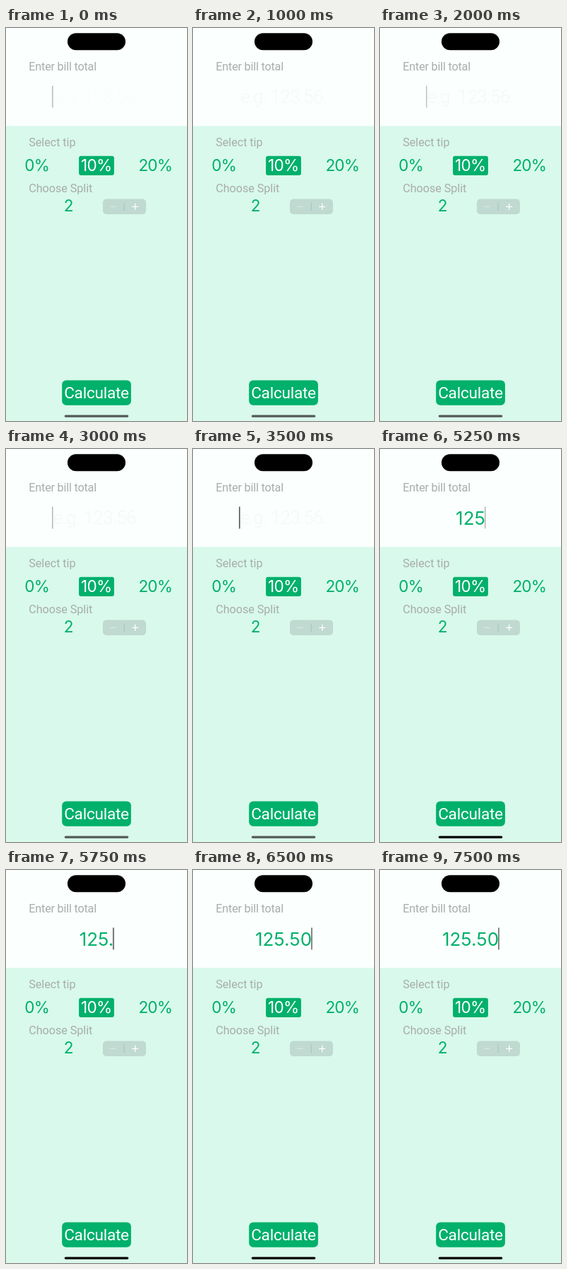
Write an HTML page that moves like this. It is 256 px wide and 555 px high and loops after 8 s.

```html
<!DOCTYPE html>
<html lang="en">
<head>
<meta charset="utf-8">
<title>Tip calculator</title>
<style>
  html, body { margin: 0; width: 100%; height: 100%; overflow: hidden; background: #fbfffe; }
  svg { display: block; width: 256px; height: 555px; }

  .label { font: 16.2px Roboto, sans-serif; fill: #a9adab; letter-spacing: -.05px; }
  .num { font: 22.6px Inter, sans-serif; fill: #00b06b; text-anchor: middle; }
  .tip { letter-spacing: -.8px; }
  .bill { font-size: 26px; }
  .on { fill: #fff; }
  .button { font: 22.6px Roboto, sans-serif; fill: #fff; text-anchor: middle; letter-spacing: -.25px; }
  .hint { font: 300 26px Roboto, sans-serif; fill: #f3f9f8; text-anchor: middle; letter-spacing: -.75px; }

  .hint, .bill, #caret, #home { animation: 8s step-end infinite; }
  .hint { animation-name: hint; }
  #caret { fill: #3a4140; animation-name: blink, travel; }
  #home { animation-name: home; }
  #b1 { animation-name: b1; }
  #b2 { animation-name: b2; }
  #b3 { animation-name: b3; }
  #b4 { animation-name: b4; }

  @keyframes hint {
    0% { opacity: .25; }
    3.125% { opacity: .45; }
    6.25% { opacity: .65; }
    9.375% { opacity: .8; }
    12.5% { opacity: .9; }
    15.625% { opacity: 1; }
    46.875%, 100% { opacity: 0; }
  }
  @keyframes blink {
    0% { opacity: .38; }
    3.125% { opacity: 0; }
    6.25% { opacity: 1; }
    9.375% { opacity: .9; }
    12.5% { opacity: 0; }
    15.625% { opacity: 1; }
    25% { opacity: .34; }
    28.125% { opacity: 0; }
    31.25% { opacity: 1; }
    37.5% { opacity: .4; }
    40.625% { opacity: 0; }
    43.75% { opacity: 1; }
    53.125% { opacity: 0; }
    56.25% { opacity: .6; }
    59.375% { opacity: 1; }
    65.625% { opacity: .4; }
    68.75% { opacity: 1; }
    81.25% { opacity: .9; }
    84.375% { opacity: 1; }
    87.5% { opacity: .4; }
    90.625% { opacity: 0; }
    93.75%, 100% { opacity: .9; }
  }
  @keyframes travel {
    0% { transform: translateX(65.1px); }
    46.875% { transform: translateX(148px); }
    68.75% { transform: translateX(151.2px); }
    75% { transform: translateX(159.4px); }
    81.25%, 100% { transform: translateX(167.2px); }
  }
  @keyframes home {
    0% { fill: #535a57; }
    46.875%, 100% { fill: #000; }
  }
  @keyframes b1 {
    0% { opacity: 0; }
    46.875% { opacity: 1; }
    68.75%, 100% { opacity: 0; }
  }
  @keyframes b2 {
    0% { opacity: 0; }
    68.75% { opacity: 1; }
    75%, 100% { opacity: 0; }
  }
  @keyframes b3 {
    0% { opacity: 0; }
    75% { opacity: 1; }
    81.25%, 100% { opacity: 0; }
  }
  @keyframes b4 {
    0% { opacity: 0; }
    81.25%, 100% { opacity: 1; }
  }
</style>
</head>
<body>
<svg viewBox="0 0 256 555">
  <rect width="256" height="555" fill="#fbfffe"/>
  <rect y="138.4" width="256" height="416.6" fill="#d8f9eb"/>
  <rect x="87" y="7.2" width="82" height="24.1" rx="12"/>

  <text class="label" x="32.3" y="60.4" style="letter-spacing: -.2px">Enter bill total</text>
  <text class="hint" x="128" y="106.3">e.g. 123.56.</text>
  <text class="num bill" id="b1" x="128" y="106.6">125</text>
  <text class="num bill" id="b2" x="128" y="106.6">125.</text>
  <text class="num bill" id="b3" x="128" y="106.6">125.5</text>
  <text class="num bill" id="b4" x="128" y="106.6">125.50</text>
  <rect id="caret" y="81.5" width="1.4" height="31"/>

  <text class="label" x="32.2" y="167.2">Select tip</text>
  <rect x="103.1" y="180.8" width="49.8" height="27.2" rx="3" fill="#00b06b"/>
  <text class="num tip" x="43.6" y="202.3">0%</text>
  <text class="num tip on" x="127.7" y="202.3">10%</text>
  <text class="num tip" x="211.3" y="202.3">20%</text>

  <text class="label" x="32.2" y="232.2">Choose Split</text>
  <text class="num" x="88.7" y="259.3">2</text>
  <rect x="137" y="241.5" width="61" height="21.5" rx="5" fill="#c0d9d1"/>
  <path d="M167.2 246.5v12" stroke="#a9c2b8"/>
  <path d="M147 252.3h9" stroke="#d9e8e2" stroke-width="1.2"/>
  <path d="M178.2 252.3h9M182.7 247.8v9" stroke="#fff" stroke-width="1.3"/>

  <rect x="79.2" y="497.6" width="97.7" height="35.2" rx="6" fill="#00b06b"/>
  <text class="button" x="128" y="523.2">Calculate</text>
  <rect id="home" x="82.7" y="546.5" width="90.6" height="3.2" rx="1.6"/>
</svg>
</body>
</html>
```
